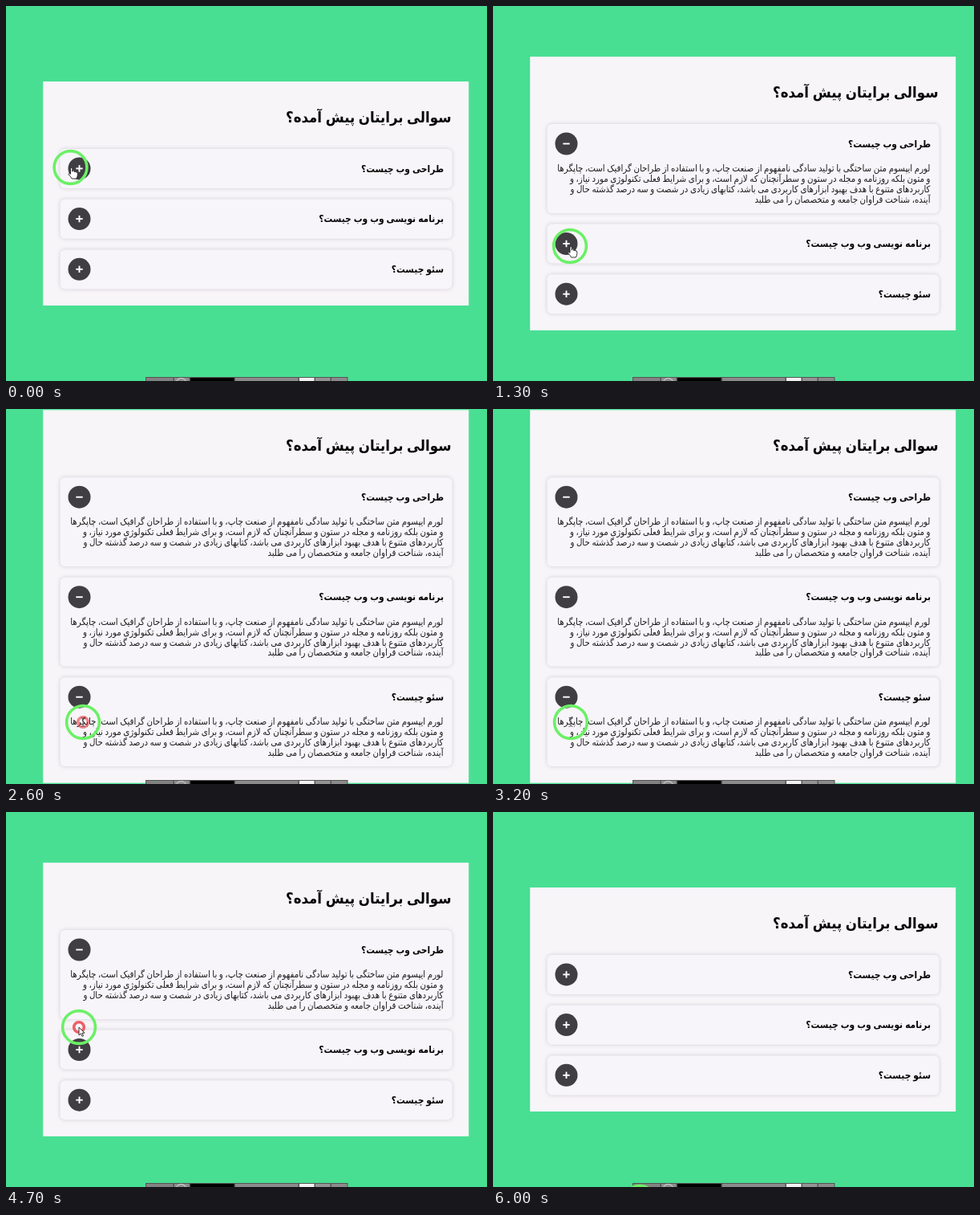
These frames come from a looping animation (600x467 px, 6.1 s). An HTML page:

```html
<!DOCTYPE html>
<html lang="fa">
<head>
<meta charset="utf-8">
<style>
  html, body { margin: 0; width: 100%; height: 100%; overflow: hidden; background: #49df93; }
  svg { display: block; width: 600px; height: 467px; }
  text {
    font-family: "DejaVu Sans Condensed", "DejaVu Sans", Tahoma, sans-serif;
    font-stretch: condensed; word-spacing: -.06em; direction: rtl; fill: #050505;
  }
  .bold { font-weight: bold; }
  .body { fill: #1c1c1c; }
  .box { fill: #f7f5f9; filter: drop-shadow(0 0 2.5px rgba(40, 30, 60, .19)); }
</style>
</head>
<body>
<svg id="stage" viewBox="0 0 600 467">
  <rect width="600" height="467" fill="#49df93"/>
  <g id="card"></g>
  <g id="bar"></g>
  <g id="pointer">
    <circle r="20.4" fill="none" stroke="#6bf066" stroke-width="3.6"/>
    <circle id="press" r="6.3" fill="none" stroke="#ec2029" stroke-width="3.6"/>
    <path id="hand" fill="#fff" stroke="#222" stroke-width=".9" stroke-linejoin="round"
      d="M0 1.2Q1.2-.3 2.3 1.2V5.2Q4-.2 4.6 5.5Q6.3 4.3 6.8 6Q8.8 5.4 8.8 7.3V9.5Q8.6 12 7.4 14H1.6Q0 11-2.6 8.6Q-2.4 6.6 0 8.3Z"/>
    <path id="beam" fill="none" stroke="#555" stroke-width=".9"
      d="M-2.5-5.5Q0-5.5 0-4Q0-5.5 2.5-5.5M0-4V4M-2.5 5.5Q0 5.5 0 4Q0 5.5 2.5 5.5"/>
    <path id="arrow" fill="#fff" stroke="#222" stroke-width=".9" d="M0 0V10L2.4 7.8L4 11.4L5.6 10.7L4 7.2H7Z"/>
  </g>
</svg>
<script>
const NS = "http://www.w3.org/2000/svg";
const LOOP = 6100, STEP = 100;
const $ = id => document.getElementById(id);

function add(parent, tag, attrs = {}, content = "") {
  const el = document.createElementNS(NS, tag);
  for (const key in attrs) el.setAttribute(key, attrs[key]);
  el.textContent = content;
  parent.append(el);
  return el;
}

// Font size at which a phrase takes the given room
function sizeFor(phrase, room, style) {
  const probe = add($("stage"), "text", { class: style, "font-size": 100 }, phrase);
  const size = 100 * room / probe.getComputedTextLength();
  probe.remove();
  return size;
}

const title = "سوالی برایتان پیش آمده؟";
const questions = ["طراحی وب چیست؟", "برنامه نویسی وب وب چیست؟", "سئو چیست؟"];
const answer = [
  "لورم ایپسوم متن ساختگی با تولید سادگی نامفهوم از صنعت چاپ، و با استفاده از طراحان گرافیک است، چاپگرها",
  "و متون بلکه روزنامه و مجله در ستون و سطرآنچنان که لازم است، و برای شرایط فعلی تکنولوژی مورد نیاز، و",
  "کاربردهای متنوع با هدف بهبود ابزارهای کاربردی می باشد، کتابهای زیادی در شصت و سه درصد گذشته حال و",
  "آینده، شناخت فراوان جامعه و متخصصان را می طلبد"
];
const headSize = sizeFor(questions[1], 156, "bold");
const bodySize = sizeFor(answer[0], 466, "body");

const CLOSED = 49, EXTRA = 61.8, GAP = 13.7;
const card = $("card");
const panel = add(card, "rect", { x: 46.2, width: 531, fill: "#f7f5f8" });
add(card, "text", { x: 555.5, y: 51, class: "bold", "font-size": sizeFor(title, 206.5, "bold") }, title);

const items = questions.map(question => {
  const g = add(card, "g");
  const box = add(g, "rect", { x: 67.5, width: 489, rx: 6, class: "box" });
  add(g, "text", { x: 546, y: 28.5, class: "bold", "font-size": headSize }, question);
  add(g, "circle", { cx: 91.5, cy: 24.4, r: 14, fill: "#403e42" });
  add(g, "path", { d: "M87.3 24.4h8.4", stroke: "#fff", "stroke-width": 1.9 });
  const upright = add(g, "path", { d: "M91.5 20.2v8.4", stroke: "#fff", "stroke-width": 1.9 });
  const body = add(g, "g");
  answer.forEach((line, i) =>
    add(body, "text", { x: 545.5, y: 59.1 + 12.85 * i, class: "body", "font-size": bodySize }, line));
  return { g, box, upright, body };
});

// Small toolbar: left edge, width, colour
const bar = $("bar");
[[174, 35, "#828282"], [209, 20, "#8e8e8e"], [229, 56, "#000"], [285, 80, "#8b8b8b"],
 [365, 20, "#f2f2f2"], [385, 20, "#949494"], [405, 21, "#8b8b8b"]]
  .forEach(([x, width, fill]) =>
    add(bar, "rect", { x: x + .5, y: 462.5, width: width - .5, height: 8, fill, stroke: "#555", "stroke-width": 1 }));
add(bar, "circle", { cx: 218.5, cy: 470, r: 6.5, fill: "#8e8e8e", stroke: "#ddd" });

// Presses: button down, button up, item
const clicks = [[200, 300, 0], [1500, 1600, 1], [2400, 2500, 2], [4100, 4200, 2], [4600, 4700, 1], [5200, 5300, 0]];

// Pointer path: time, x, y
const path = [
  [0, 80.5, 201], [800, 80.5, 201], [1300, 96, 299], [1800, 96, 299], [2400, 96, 390],
  [2600, 96, 390], [2900, 97, 399], [3200, 97, 390], [3400, 97, 390], [3700, 101, 396],
  [4000, 93.5, 364], [4200, 93.5, 364], [4600, 91, 268], [4800, 91, 268], [5100, 87.5, 176],
  [5300, 87.5, 176], [5500, 95, 185], [6000, 183, 486]
];

function pointerAt(t) {
  const i = path.findIndex(p => p[0] > t);
  if (i < 0) return path[path.length - 1].slice(1);
  const [t0, x0, y0] = path[i - 1], [t1, x1, y1] = path[i];
  const u = (t - t0) / (t1 - t0);
  const k = i === path.length - 1 ? u : u * u * (3 - 2 * u);
  return [x0 + (x1 - x0) * k, y0 + (y1 - y0) * k];
}

function pressAt(t) {
  const last = clicks.filter(c => c[0] <= t).pop();
  if (!last) return 0;
  return t < last[1] ? .9 : Math.max(0, .7 * (1 - (t - last[1]) / 400));
}

const show = (el, on) => el.setAttribute("visibility", on ? "visible" : "hidden");

function draw(t) {
  const open = items.map((_, i) => clicks.filter(c => c[2] === i && c[1] <= t).length % 2);
  const count = open.reduce((a, b) => a + b, 0);
  const top = 94 - EXTRA / 2 * count;
  const [px, py] = pointerAt(t);
  let cursor = "arrow", y = 84;

  card.setAttribute("transform", `translate(0 ${top})`);
  panel.setAttribute("height", 279 + EXTRA * count);
  items.forEach((item, i) => {
    const height = CLOSED + EXTRA * open[i];
    const dy = py - top - y;
    item.g.setAttribute("transform", `translate(0 ${y})`);
    item.box.setAttribute("height", height);
    show(item.upright, !open[i]);
    show(item.body, open[i]);
    if (Math.hypot(px - 91.5, dy - 24.5) < 14) cursor = "hand";
    else if (open[i] && dy > 48 && dy < 101) cursor = "beam";
    y += height + GAP;
  });

  $("pointer").setAttribute("transform", `translate(${px} ${py})`);
  $("press").setAttribute("opacity", pressAt(t));
  ["hand", "beam", "arrow"].forEach(id => show($(id), id === cursor));
}

const start = performance.now();
function tick() {
  const t = (performance.now() - start) % LOOP;
  draw(Math.floor(t / STEP) * STEP);
  requestAnimationFrame(tick);
}
tick();
</script>
</body>
</html>
```
